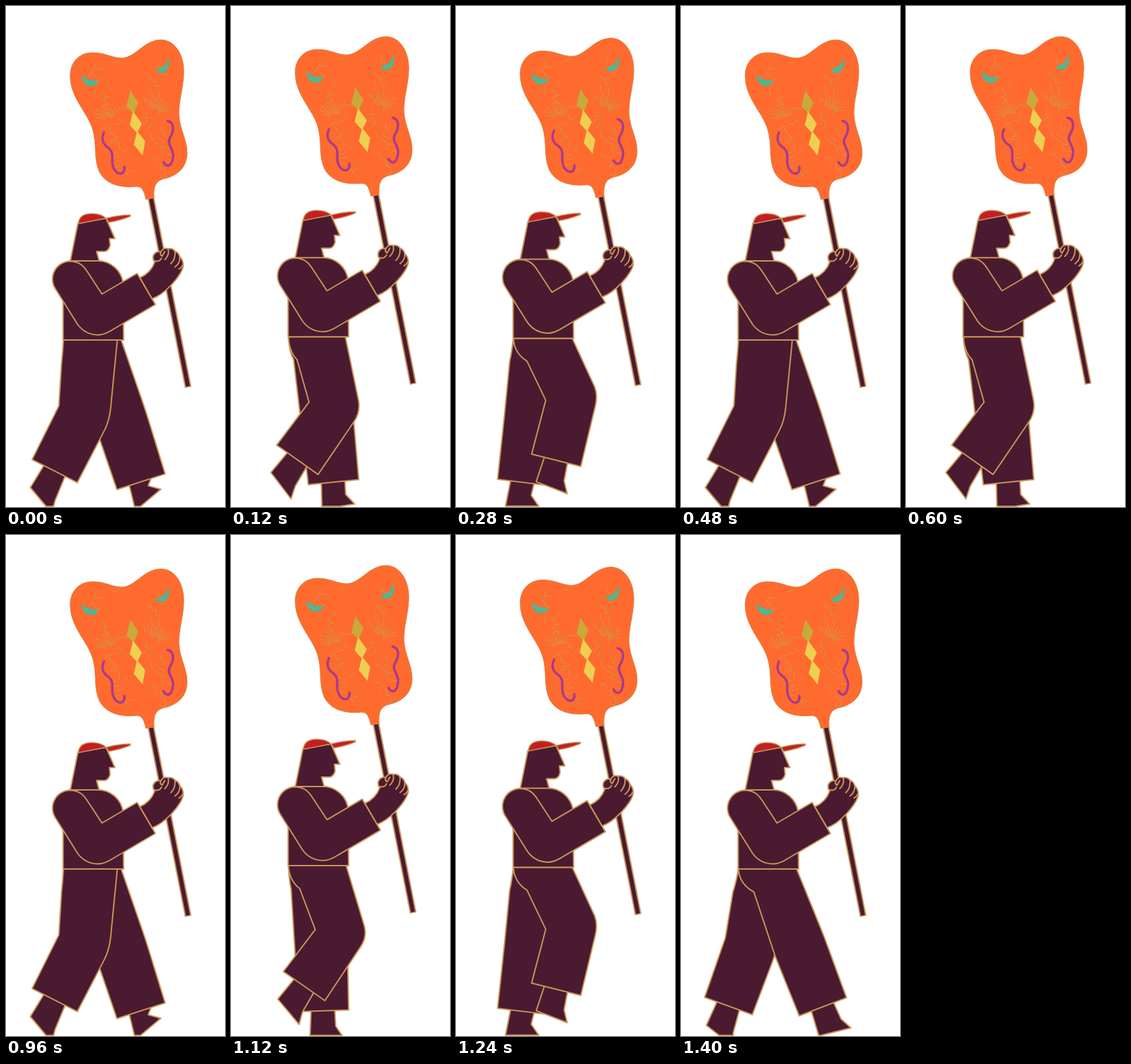
Write an HTML page that moves like this. It is 324 by 741 pixels and loops after 1440 ms.

```html
<!DOCTYPE html>
<html lang="en">
<head>
<meta charset="utf-8">
<title>Walking with a fan</title>
<style>
  html, body { margin: 0; width: 100%; height: 100%; overflow: hidden; background: #fff; }
  svg { display: block; width: 324px; height: 741px; }
  .ink { fill: #4a1a30; stroke: #c8955a; stroke-width: 2; stroke-linejoin: round; }
  .ink .cap { fill: #c41e24; stroke-width: 1.6; }
  .line, .ink .line { fill: none; stroke-linecap: round; }
</style>
</head>
<body>
<svg viewBox="0 0 324 741">
  <g class="ink">
    <path id="farFoot"/><path id="farLeg"/>
    <path id="nearFoot"/><path id="nearLeg"/>
  </g>
  <g id="body">
    <!-- pole -->
    <path d="M214 282L269.500 564" stroke="#c8955a" stroke-width="10"/>
    <path d="M214 282L269.200 562.500" stroke="#4a1a30" stroke-width="6"/>
    <!-- fan -->
    <path fill="#ff6a2f" stroke="#dd8444" d="M95 105C94 85 107 69 128 69C148 69 156 77 172 77C192 76 204 50 230 50C252 51 264 75 263 100C262 125 255 140 256 162C257 182 268 198 268 217C268 240 252 251 236 255C222 258 218 265 219 284L207 286C204 274 202 267 193 267C165 270 146 261 138 245C130 226 134 210 130 190C125 160 96 140 95 105Z"/>
    <path id="ornament" class="line" stroke="#d98f45" stroke-width="1.200"/>
    <g fill="#4db892">
      <path d="M112 100C118 111 128 109 137 111C133 119 124 120 118 116C113 112 112 106 112 100Z"/>
      <path d="M241 76C238 88 230 92 221 95C225 101 233 100 238 95C242 89 242 82 241 76Z"/>
    </g>
    <path fill="#c9a83c" d="M184 125L196 143L189 159L178 149Z"/>
    <path fill="#efcf50" d="M188 156L201 174L194 188L183 176ZM194 185L206 200L202 221L189 205Z"/>
    <path class="line" stroke="#a93b8b" stroke-width="3.500" d="M145 187C139 200 147 207 152 210C161 218 155 226 158 236C162 252 177 251 175 238M239 170C249 172 249 184 243 194C236 205 250 212 247 224C245 238 238 239 233 231"/>
    <!-- figure -->
    <g class="ink">
      <path d="M95 378L106.500 321L148 314L161 344H153L154 354Q152 362 146 363H134L138 378Z"/>
      <path class="cap" d="M107 322C108 309 118 307 127 307C138 307 144 310 148 314Z"/>
      <path class="cap" d="M148 314Q168 309 184 309V311Q170 317 152 320Z"/>
      <path d="M84.500 494V410Q84 377 96 377H136C156 377 170 392 173 408L174 494Z"/>
      <path d="M198 402Q214 395 220 379Q215 372 220 366Q225 362 229 364Q232 357 240 359Q247 358 250 363Q256 365 257 371Q263 376 262 386C258 400 236 426 216 433Z"/>
      <path class="line" d="M220 377Q227 379 230 373M229 364Q227 368 231 370L235 363M240 360Q242 368 235 375M250 363Q251 374 244 381M257 371Q258 380 250 386M262 382Q260 387 256 389"/>
      <path d="M95 377.500C110 378 116 386 121 394L142 426L194 395.500L221 441.500L158 478.500Q146 486.500 136 486.500Q117 486 106 471L73.500 419A26.500 26.500 0 0 1 95 377.500Z"/>
    </g>
  </g>
</svg>
<script>
const $ = id => document.getElementById(id);
const STEP = 480, STRIDE = 960, FLOOR = 740;

// One leg over a stride of two steps; angles in degrees, positive leans back
const times = [0, 160, 280, 440, 480, 640, 760, 920];
const leg = {
  thigh: [6, -20, -27, -23, -20, -3, 8, 12],
  shin: [27, 35, 14, -21, -18, -2, 7, 20],
  foot: [50, 50, 21, -14, -40, 0, 0, 38],
  reach: [109, 106, 98, 124, 126, 119, 119, 115]
};

// Smooth cyclic curve through the keys of one track
function sample(track, t) {
  const n = times.length;
  const value = i => track[(i + n) % n];
  const time = i => times[(i + n) % n] + STRIDE * Math.floor(i / n);
  const slope = i => (value(i + 1) - value(i - 1)) / (time(i + 1) - time(i - 1));
  let i = n - 1;
  while (times[i] > t) i--;
  const span = time(i + 1) - time(i), u = (t - time(i)) / span;
  const a = value(i), b = value(i + 1), m = slope(i) * span, k = slope(i + 1) * span;
  return a + u * (m + u * (3 * (b - a) - 2 * m - k + u * (2 * (a - b) + m + k)));
}

const mix = (p, q, k) => p.map((v, i) => v + (q[i] - v) * k);
const path = points => `M${points.join('L')}Z`;

// Point (x, y) in a frame turned by deg around origin
function place([ox, oy], deg, x, y) {
  const c = Math.cos(deg * Math.PI / 180), s = Math.sin(deg * Math.PI / 180);
  return [ox + x * c - y * s, oy + x * s + y * c];
}

// Cut a polygon off at the floor
function aboveFloor(points) {
  return points.flatMap((p, i) => {
    const q = points[(i + 1) % points.length];
    const kept = p[1] <= FLOOR ? [p] : [];
    if ((p[1] <= FLOOR) !== (q[1] <= FLOOR)) kept.push(mix(p, q, (FLOOR - p[1]) / (q[1] - p[1])));
    return kept;
  });
}

function drawLeg(side, t, lift) {
  const [thigh, shin, foot, reach] = Object.values(leg).map(track => sample(track, t));
  const hip = 494 - lift, bend = (thigh + shin) / 2;
  const knee = place([127, hip], thigh, 0, reach), hem = place(knee, shin, 0, 96);
  const kneeB = place(knee, bend, -39, 0), kneeF = place(knee, bend, 39, 0);
  const hemB = place(hem, shin, -37.5, 0), hemF = place(hem, shin, 37.5, 0);
  const hipB = [85, hip], hipF = [166 - thigh * .22, hip];
  const fold = [85 + (kneeB[0] - 85) * .42, hip + 34];
  const heel = place(hem, shin, -21, 38);

  $(side + 'Foot').setAttribute('d', path(aboveFloor([
    place(hem, shin, -18, -2), heel, place(heel, foot, 49, 0),
    place(heel, foot, 38, -16), place(hem, shin, 17, -2)
  ])));
  $(side + 'Leg').setAttribute('d',
    `M${hipB}Q${Math.min(86, (85 + fold[0]) / 2)} ${hip + 22} ${fold}L${kneeB}L${hemB}L${hemF}` +
    `L${mix(kneeF, hemF, .16)}Q${kneeF} ${mix(kneeF, hipF, .16)}L${hipF}Z`);
}

// Fine ornament: feathered plumes and scattered curls
function ornament() {
  let seed = 7, d = '';
  const random = () => (seed = seed * 16807 % 2147483647) / 2147483647;
  const stroke = (origin, deg, from, to, bow) => {
    d += `M${place(origin, deg, from, 0)}Q${place(origin, deg, (from + to) / 2, bow)} ${place(origin, deg, to, 0)}`;
  };
  for (let i = 0; i < 9; i++) {
    stroke([152, 170], -165 + i * 14, 7, 20 + i % 3 * 3, 2);
    stroke([222, 158], -10 - i * 14, 7, 20 + i % 3 * 3, -2);
  }
  for (let i = 0; i < 64; i++) {
    const y = 82 + i * 2.7, side = i % 2 ? 1 : -1;
    const x = 179 + (y - 90) * .16 + side * (15 + random() * (y < 130 ? 42 : 28));
    stroke([x, y], random() * 180, -4, 4 + random() * 4, random() * 8 - 4);
  }
  $('ornament').setAttribute('d', d);
}

function draw(now) {
  const t = Math.floor(now % STEP / 40) * 40;
  // Quick rise, slower fall
  const lift = 5 * Math.sin(Math.PI * Math.min(1, t / 440) ** .65) ** 2;
  drawLeg('far', t + STEP, lift);
  drawLeg('near', t, lift);
  $('body').setAttribute('transform', `translate(0 ${-lift})`);
}

ornament();
const start = performance.now();
(function tick() {
  draw(performance.now() - start);
  requestAnimationFrame(tick);
})();
</script>
</body>
</html>
```
